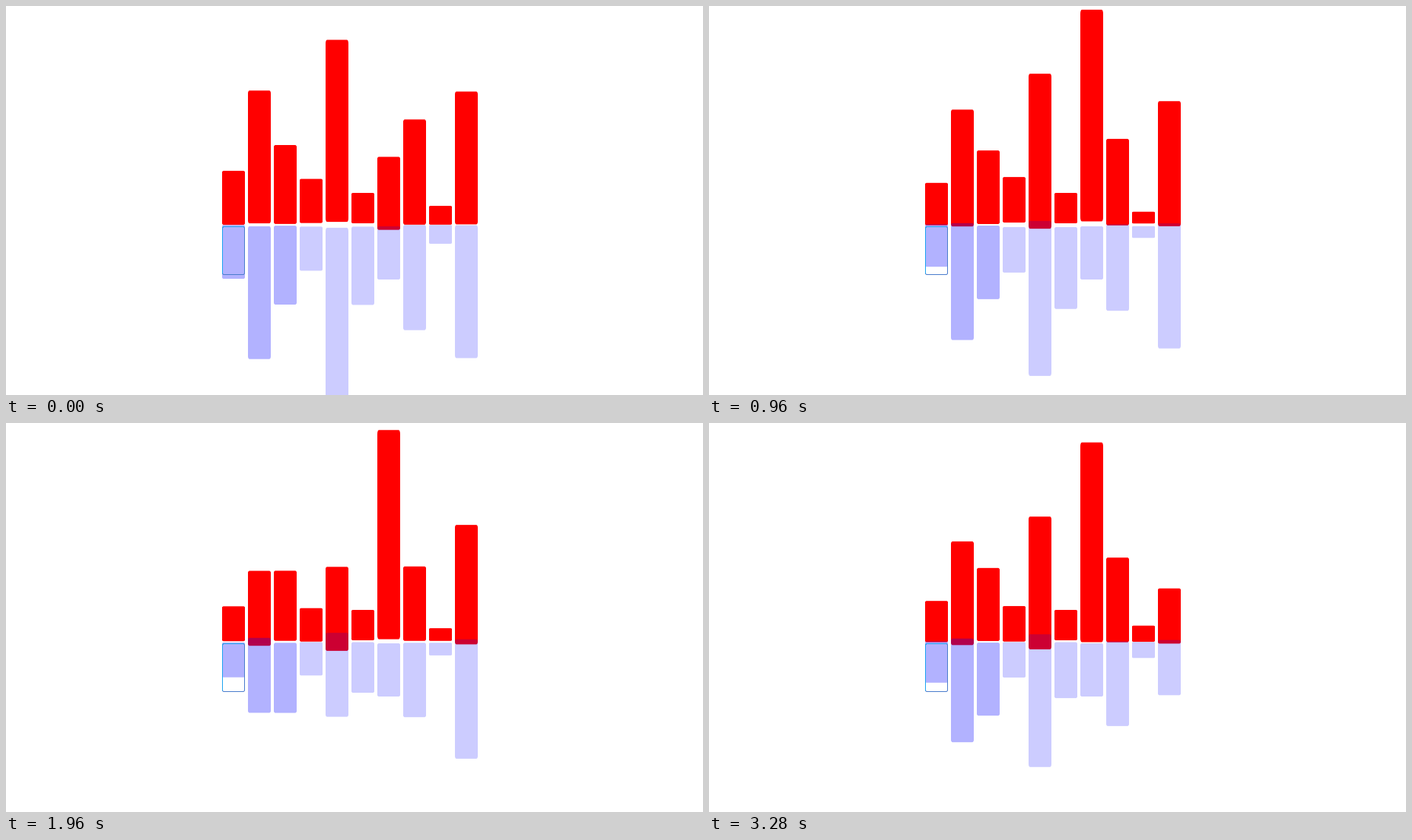
Write a matplotlib script that moves like this. It is 916 by 512 pixels and loops after 3.32 s.

```python
import matplotlib.pyplot as plt
from matplotlib.animation import FuncAnimation
from matplotlib.patches import PathPatch
from matplotlib.path import Path

W, H, DPI = 916, 512, 100
FRAMES, STEP_MS = 83, 40
LEFT, PITCH, BAR_W = 284, 34, 30
MIRROR = 288

# pulse rhythm: (cycles per frame, remaining part of the cycle at the start, ease power)
SLOW = (1 / 15, 0.073, 2.4)
QUICK = (1 / 6.46, 0.528, 2.3)
MID = (0.0927, 0.302, 2.3)
TALL = (0.11695, 0.916, 2.3)
TINY = (0.2335, 0.83, 2.3)
LAST = (0.077, 0.25, 2.3)
STILL = (0, 0, 1)

# (rhythm, final height, growth, final base, bulge of the base in mid-pulse)
BARS = [
    (QUICK, 80, 39, 286, 11),
    (SLOW, 175, 128, 286, 30),
    (QUICK, 108, 18, 286.5, 2),
    (MID, 60, 30, 285, 11),
    (SLOW, 240, 217, 284, 66),
    (STILL, 40, 0, 286, 0),
    (TALL, 280, 225, 283, 78),
    (QUICK, 153, 63, 285, 16),
    (TINY, 15, -15, 286, 8),
    (LAST, 180, 125, 286, 36),
]
# reflections that do not follow their bar
LOOSE = {5: (MID, 108, 78, 285, 10), 6: (STILL, 70, 0, 286, 0)}


def span(bar, t):
    """Top and base of a bar at time t, easing out to its final height."""
    (freq, start, power), height, growth, base, bulge = bar
    left = ((start - freq * t) % 1) ** power
    base += bulge * left * (1 - left)
    return base - (height - growth * left), base


def round_rect(x, top, bottom, width=BAR_W, rx=2.2, ry=None):
    if ry is None:
        ry = 0.8 + 1.2 * (bottom - top) / 70
    r = x + width
    points = [(x + rx, top), (r - rx, top), (r, top), (r, top + ry),
              (r, bottom - ry), (r, bottom), (r - rx, bottom),
              (x + rx, bottom), (x, bottom), (x, bottom - ry),
              (x, top + ry), (x, top), (x + rx, top)]
    codes = [Path.MOVETO] + [Path.LINETO, Path.CURVE3, Path.CURVE3] * 4
    return Path(points, codes)


fig = plt.figure(figsize=(W / DPI, H / DPI), dpi=DPI, facecolor="white")
ax = fig.add_axes([0, 0, 1, 1])
ax.set_xlim(0, W)
ax.set_ylim(H, 0)
ax.axis("off")


def add_patch(path, **style):
    return ax.add_patch(PathPatch(path, **style))


def bar_x(i):
    return LEFT + PITCH * i


blank = round_rect(0, 0, 1)
reds = [add_patch(blank, fc="#ff0000", lw=0, zorder=1) for _ in BARS]
mirrors = [add_patch(blank, fc="#0000ff", lw=0, alpha=0.3 if i < 3 else 0.2, zorder=2)
           for i in range(len(BARS))]

# thin frame around the first reflection
px = 72 / DPI
add_patch(round_rect(284.5, 290.5, 353.5, 29, 2, 2), fc="none",
          ec="#4b7dcd", lw=px, zorder=3)
ax.plot([284.5, 284.5, 286, 312], [352, 292, 290.5, 290.5],
        color="#1ea5f0", lw=px, zorder=4)


def draw(t):
    for i, bar in enumerate(BARS):
        x = bar_x(i)
        reds[i].set_path(round_rect(x, *span(bar, t)))
        top, base = span(LOOSE.get(i, bar), t)
        mirrors[i].set_path(round_rect(x, 2 * MIRROR - base, 2 * MIRROR - top))
    return reds + mirrors


anim = FuncAnimation(fig, draw, frames=FRAMES, interval=STEP_MS,
                     repeat=True, repeat_delay=0, blit=False)
plt.show()
```
